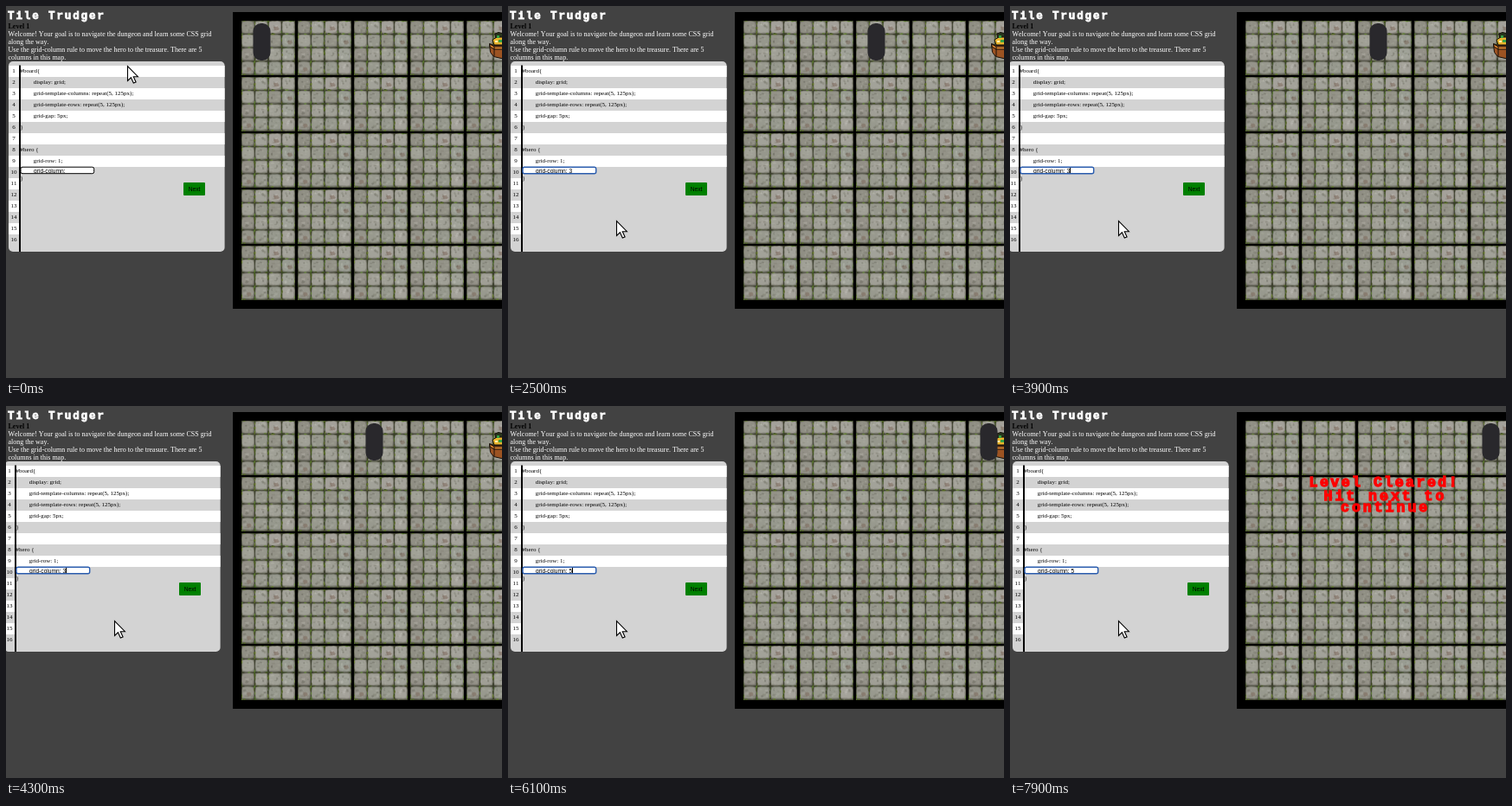
Animation, 573 px wide and 430 px high, one loop 8 s. Source, as an HTML page with a canvas:

```html
<!DOCTYPE html>
<html lang="en">
<head>
<meta charset="utf-8">
<title>Tile Trudger</title>
<style>
  html, body { margin: 0; width: 100%; height: 100%; overflow: hidden; background: #424242; }
  canvas, svg { position: absolute; left: 0; top: 0; }
  text { white-space: pre; font-kerning: none; }
  .serif { font: 8px "Liberation Serif", serif; fill: #fff; }
  .level { font-weight: bold; fill: #000; }
  .code { font: 7px "Liberation Serif", serif; }
  .sans { font: 6.67px "Liberation Sans", sans-serif; }
  .serif, .code, .sans { font-kerning: none; }
  .pixel { font: bold 12.5px "Liberation Mono", monospace; letter-spacing: 1.9px; fill: #fff; stroke: #fff; stroke-width: .8; }
  .win { font-size: 16.5px; letter-spacing: 2.5px; fill: #f00; stroke: #f00; stroke-width: 1.3; }
  .hint { letter-spacing: 3px; }
</style>
</head>
<body>
<canvas id="board" width="573" height="430"></canvas>
<svg width="573" height="430" viewBox="0 0 573 430">
  <defs><clipPath id="inputClip"><rect x="18" y="186.5" width="83" height="6.8"/></clipPath></defs>

  <text class="pixel" x="2" y="15">Tile Trudger</text>
  <text class="serif level" x="2.5" y="26">Level 1</text>
  <g id="intro" class="serif"></g>

  <g id="panel">
    <rect x="3" y="64" width="249.6" height="220" rx="5" fill="#d3d3d3"/>
    <g id="rows" fill="#fff"></g>
    <rect x="15" y="68.5" width="2" height="215.5"/>
    <g id="code" class="code"></g>
    <rect id="field" x="17" y="186.2" width="84.7" height="7.5" rx="2" fill="#fff"/>
    <g clip-path="url(#inputClip)">
      <text id="entry" class="sans" x="32" y="192.7"></text>
      <rect id="caret" y="187" width="1" height="6.5"/>
    </g>
    <rect x="205" y="204" width="25" height="15" rx="1" fill="#008000"/>
    <text class="sans" x="217.5" y="213.8" text-anchor="middle">Next</text>
  </g>

  <g id="chest" stroke="#16100a" stroke-width="1">
    <path d="M565 32l4-1.5 8 2v10h-11z" fill="#27351c"/>
    <path d="M562 39l5-3h10v9h-13z" fill="#e9b52d"/>
    <path d="M567 34h3v3h-3zM569 39h4v3h-4z" fill="#38a044" stroke="none"/>
    <path d="M565 40h3v2h-3z" fill="#fff3b0" stroke="none"/>
    <path d="M558.5 43.5l5 2h13v16l-13-3-4-5z" fill="#9c5322"/>
    <path d="M559 44l5 3h13v3h-13l-5-3z" fill="#dd842f"/>
    <path d="M564 47v11" fill="none"/>
  </g>
  <rect id="hero" y="20" width="20" height="43" rx="9" fill="#29282c"/>

  <g id="win">
    <text class="pixel win" x="345.5" y="93">Level Cleared!</text>
    <g id="hint">
      <text class="pixel win hint" x="362.5" y="109">Hit next to</text>
      <text class="pixel win hint" x="382" y="122">continue</text>
    </g>
  </g>

  <path id="arrow" d="M0 0v17l3.9-3.7 2.9 6.3 2.8-1.2-2.8-6.2h5.1z" fill="#fff" stroke="#000" stroke-width="1.1"/>
  <g id="ibeam" fill="none">
    <path d="M-3-6.7h6M0-6.7v13.4M-3 6.7h6" stroke="#000" stroke-width="2.8" stroke-linecap="round"/>
    <path d="M-2.5-6.7h5M0-6.7v13.4M-2.5 6.7h5" stroke="#fff" stroke-width=".9"/>
  </g>
</svg>
<script>
const $ = id => document.getElementById(id);

function add(parent, tag, attrs, content = '') {
  const node = document.createElementNS('http://www.w3.org/2000/svg', tag);
  for (const key in attrs) node.setAttribute(key, attrs[key]);
  node.textContent = content;
  $(parent).append(node);
}

// Page text
['Welcome! Your goal is to navigate the dungeon and learn some CSS grid',
 'along the way.',
 'Use the grid-column rule to move the hero to the treasure. There are 5',
 'columns in this map.'
].forEach((line, i) => add('intro', 'text', { x: 2.5, y: 35 + i * 9 }, line));

for (let n = 1; n <= 16; n++) {
  const y = 56 + n * 13;
  if (n % 2) add('rows', 'rect', { x: 3, y, width: n < 10 ? 249.6 : 12, height: 13 });
  add('code', 'text', { x: 9, y: y + 8.3, 'text-anchor': 'middle' }, n);
}

['#board{', ' display: grid;', ' grid-template-columns: repeat(5, 125px);',
 ' grid-template-rows: repeat(5, 125px);', ' grid-gap: 5px;', '}', '',
 '#hero {', ' grid-row: 1;', '', '}'
].forEach((line, i) => add('code', 'text', {
  x: line[0] === ' ' ? 31.7 : 16.5,
  y: i === 10 ? 201 : 77.3 + i * 13
}, line.trim()));

// Dungeon floor: one mossy cobble tile, stamped 5 by 5
let seed = 11;
const rand = (a = 0, b = 1) => {
  seed = (seed * 16807) % 2147483647;
  return a + (b - a) * seed / 2147483647;
};

// Superellipse with a ragged edge; a higher power is squarer
function blob(g, x, y, rx, ry, jitter, color, power = 2) {
  g.beginPath();
  for (let k = 0; k < 16; k++) {
    const a = k * Math.PI / 8, c = Math.cos(a), s = Math.sin(a);
    const r = (1 - rand(0, jitter)) / (Math.abs(c) ** power + Math.abs(s) ** power) ** (1 / power);
    g.lineTo(x + rx * r * c, y + ry * r * s);
  }
  g.closePath();
  g.fillStyle = color;
  g.fill();
}

function makeTile() {
  const tile = document.createElement('canvas');
  tile.width = tile.height = 125;
  const g = tile.getContext('2d');
  g.fillStyle = '#3a3d2b';
  g.fillRect(0, 0, 125, 125);
  for (let i = 0; i < 16; i++) {
    const x = (i % 4) * 31.2 + 15.6, y = Math.floor(i / 4) * 31.2 + 15.6;
    const light = rand(54, 63), hue = rand(40, 80);
    blob(g, x, y, 15.2, 15.2, .06, `hsl(${hue} 5% ${light - 13}%)`, 9);
    blob(g, x - .6, y - .8, 13.8, 13.6, .1, `hsl(${hue} 5% ${light}%)`, 7);
    for (let k = 0; k < 8; k++) {
      const shade = k % 3 ? light + rand(2, 14) : light - rand(10, 24);
      blob(g, x + rand(-9, 9), y + rand(-9, 9), rand(2, 6), rand(1, 5), .5,
        `hsl(${hue} 6% ${shade}% / .5)`);
    }
    if (i % 5 === 2) blob(g, x + 3, y + 3, 8, 7, .5, '#79645580');
  }
  for (let i = 0; i < 130; i++) {
    const along = rand(0, 125), seam = Math.floor(rand(0, 5)) * 31.2 + rand(-1.5, 1.5);
    const [x, y] = i % 3 ? [seam, along] : [along, seam];
    const [rx, ry] = i % 3 ? [1.4, 4] : [4, 1.4];
    blob(g, x, y, rx, ry, .4, `hsl(${rand(70, 90)} 48% ${rand(17, 36)}%)`);
  }
  return tile;
}

const ctx = $('board').getContext('2d'), tile = makeTile();
ctx.imageSmoothingQuality = 'high';
ctx.fillRect(262, 7, 311, 343);
for (let i = 0; i < 25; i++)
  ctx.drawImage(tile, 272 + (i % 5) * 65, 17 + Math.floor(i / 5) * 65, 62, 62.5);

// Animation
const LOOP = 8000, STEP = 100, FOCUS = 1400, SOLVED = 6000, CLEARED = 6200;
const pointerPath = [[0, 140.5, 69.5], [700, 97, 196], [900, 85, 190.7],
  [1400, 85, 190.7], [1800, 125.5, 248.5], [LOOP, 125.5, 248.5]];

const clamp = v => Math.max(0, Math.min(1, v));
const ease = v => v * v * (3 - 2 * v);
const show = (id, on) => $(id).setAttribute('visibility', on ? 'visible' : 'hidden');
const place = (id, x, y) => $(id).setAttribute('transform', `translate(${x} ${y})`);
const scaleAt = (id, x, y, s) =>
  $(id).setAttribute('transform', `translate(${x} ${y}) scale(${s}) translate(${-x} ${-y})`);

function pointerAt(t) {
  const i = pointerPath.findIndex(p => p[0] > t);
  const [t0, x0, y0] = pointerPath[i - 1], [t1, x1, y1] = pointerPath[i];
  const p = ease((t - t0) / (t1 - t0));
  return [x0 + (x1 - x0) * p, y0 + (y1 - y0) * p];
}

function render(t) {
  const value = t >= SOLVED ? '5' : t >= 2500 && t < 5200 ? '3' : '';
  const focused = t >= FOCUS, cleared = t >= CLEARED;

  $('entry').textContent = 'grid-column: ' + value;
  $('field').setAttribute('stroke', focused ? '#2a5cae' : '#000');
  $('field').setAttribute('stroke-width', focused ? 1.4 : 1);
  const blinkStart = t >= SOLVED ? SOLVED : FOCUS;
  show('caret', focused && Math.floor((t - blinkStart) / 600) % 2 === 0);
  $('caret').setAttribute('x', value ? 74 : 70);

  // A wrong answer shakes the editor
  const shaking = t >= 3500 && t < 4400;
  place('panel', shaking ? ((t - 3500) / STEP % 2 ? 5 : -5) : 0, 0);

  $('hero').setAttribute('x', 285.5 + 65 * ((value || 1) - 1));
  show('chest', !cleared);

  show('win', cleared);
  scaleAt('win', 432, 102, ease(clamp((t - CLEARED + 200) / 500)));
  scaleAt('hint', 433, 110, 1.015 + .015 * Math.cos((t - 6800) / 1100 * Math.PI));

  const [x, y] = pointerAt(t);
  const overField = x > 17 && x < 102 && y > 186 && y < 194;
  show('arrow', !overField);
  show('ibeam', overField);
  place('arrow', x, y);
  place('ibeam', x, y);
}

const start = performance.now();
function tick() {
  const elapsed = (performance.now() - start) % LOOP;
  render(Math.floor(elapsed / STEP) * STEP);
  requestAnimationFrame(tick);
}
tick();
</script>
</body>
</html>
```
